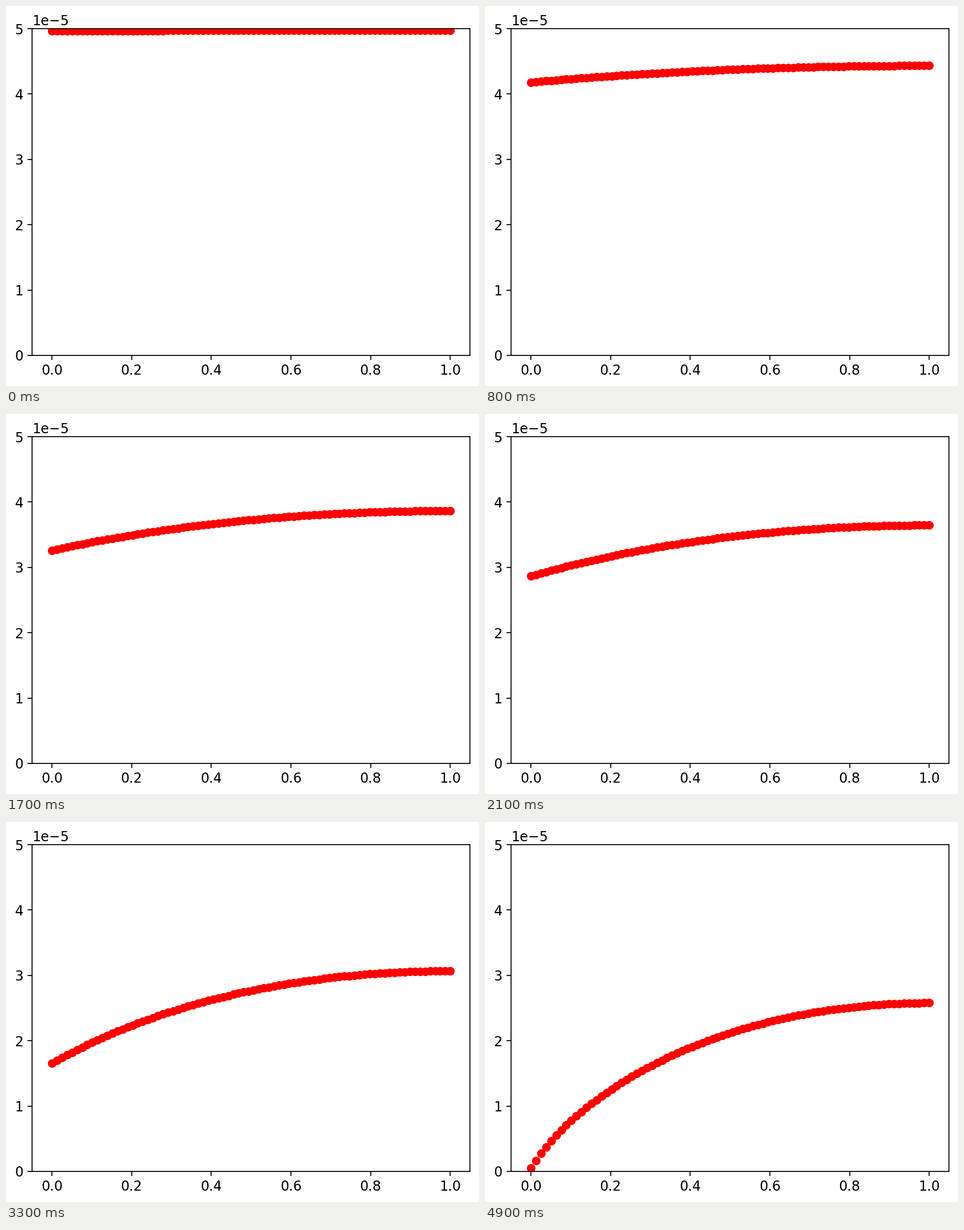
A matplotlib script that plays this animation: 835x671 px, repeating every 5 s.

```python
import numpy as np
import matplotlib.pyplot as plt
from matplotlib.animation import FuncAnimation

WIDTH, HEIGHT, DPI = 835, 671, 128
LEFT, RIGHT, TOP, BOTTOM = 46, 819.4, 40, 617
UNIT = (BOTTOM - TOP) / 5  # pixels per unit on the y axis
FRAMES, INTERVAL = 50, 100
LAST_STEP = 150


def px(size):
    """Convert pixels to points."""
    return size * 72 / DPI


plt.rcParams.update({
    "font.family": "DejaVu Sans",
    "font.size": px(23.85),
    "axes.linewidth": px(1.73),
})

x = np.linspace(0, 1, 80)
v = (1 - x) ** 2


def step_at(frame):
    """Three solver steps per frame, with an extra one every 16 frames."""
    return 3 * frame + (frame + 6) // 16


def profile(step):
    tau = step / LAST_STEP
    left = 573 - 3.783 * step
    right = 574 - 2.70 * step + 0.004025 * step**2 + 1.127e-5 * step**3
    # The curve sharpens near x = 0 as the left end drains.
    a = 0.93 - 0.258 * tau**1.8
    c = 0.088 * tau**5
    d = 0.03 * tau**12
    b = 1 - a - c - d
    drop = a * v + b * v**2 + c * v**5 + d * v**15
    return (right - (right - left) * drop) / UNIT


fig = plt.figure(figsize=(WIDTH / DPI, HEIGHT / DPI), dpi=DPI, facecolor="white")
ax = fig.add_axes([LEFT / WIDTH, 1 - BOTTOM / HEIGHT,
                   (RIGHT - LEFT) / WIDTH, (BOTTOM - TOP) / HEIGHT])
ax.set_xlim(-0.05, 1.05)
ax.set_ylim(0, 5)
ax.set_xticks(np.arange(6) / 5)
ax.set_yticks(range(6))
ax.tick_params(length=px(7.6), width=px(1.73), pad=px(7.6))
fig.text(LEFT / WIDTH, 1 - 33.5 / HEIGHT, "1e\N{MINUS SIGN}5", va="baseline")

dots, = ax.plot(x, profile(0), "o", color="red",
                markersize=px(13), markeredgewidth=px(2.17))


def update(frame):
    dots.set_ydata(profile(step_at(frame)))
    return dots,


anim = FuncAnimation(fig, update, frames=FRAMES, interval=INTERVAL,
                     repeat=True, repeat_delay=0)
plt.show()
```
